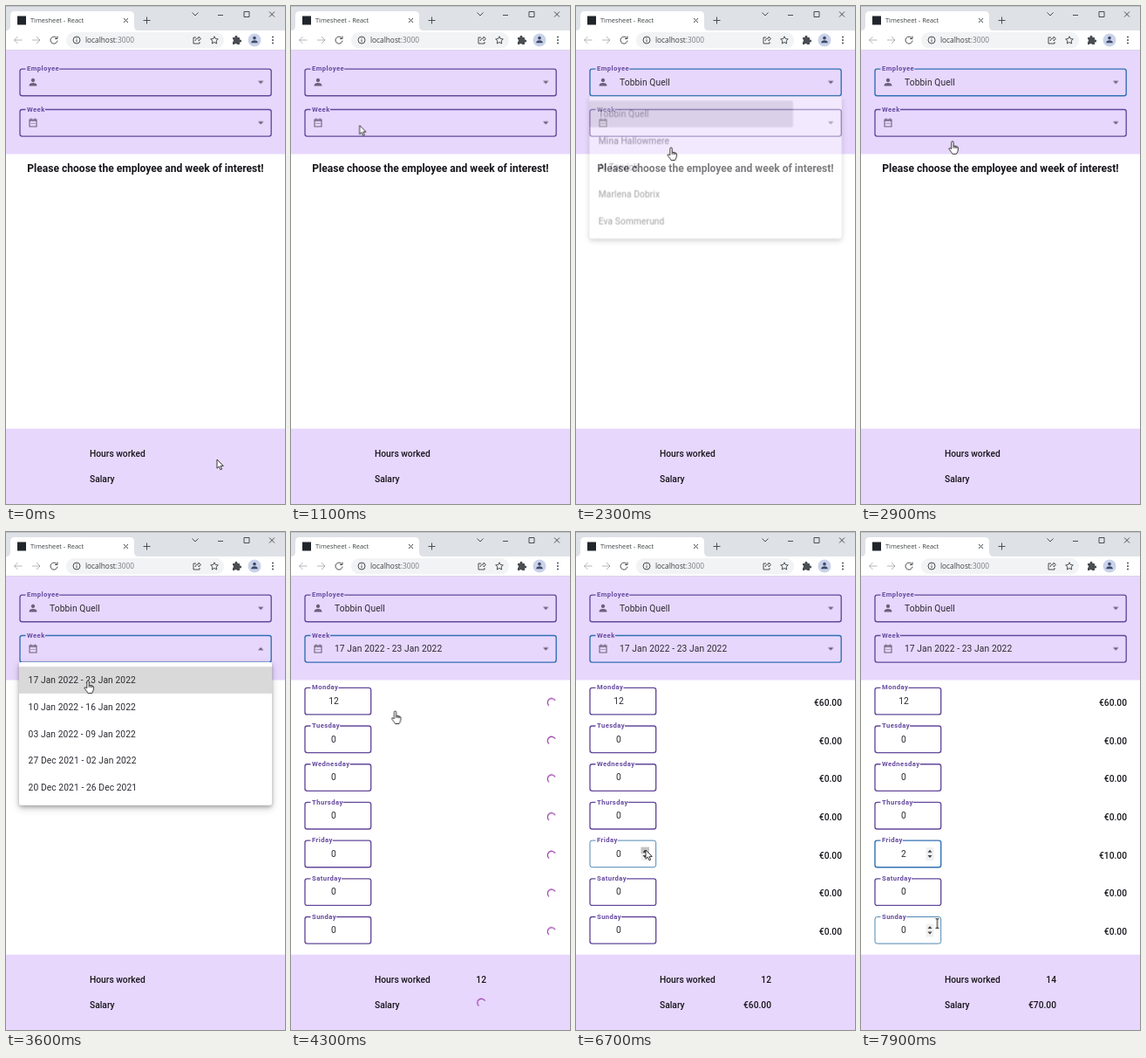
An HTML page for the animation above (8 s loop, 320 px wide and 570 px high).

```html
<!DOCTYPE html>
<html lang="en">
<head>
<meta charset="utf-8">
<title>Timesheet</title>
<style>
html, body { margin: 0; width: 100%; height: 100%; overflow: hidden; background: #fff; }
svg { display: block; width: 320px; height: 570px; }
text { font: 10.24px Roboto, sans-serif; fill: #2b2830; }
.value { letter-spacing: .1px; }
.label { font-size: 7.7px; font-weight: 700; letter-spacing: .42px; fill: #664a9f; }
.strong { font-weight: 500; fill: #17151b; }
.prompt { font-size: 12.05px; font-weight: 700; fill: #17151b; }
.title, .url { font-family: "Open Sans", sans-serif; fill: #3c4043; }
.title { font-size: 7.4px; }
.url { font-size: 8.3px; }
.mid { text-anchor: middle; }
.end { text-anchor: end; }
.border { fill: none; }
.line { fill: none; stroke: #4a4d51; stroke-width: 1; }
.spin { fill: none; stroke: #a04bae; stroke-width: 1.3; animation: spin 1.6s -.5s linear infinite; }
.paper { fill: #fff; filter: drop-shadow(0 2px 2px rgba(0,0,0,.24)) drop-shadow(0 3px 4px rgba(0,0,0,.2)); }
.cursor { fill: #fff; stroke: #222; stroke-width: .9; stroke-linejoin: round; }
@keyframes spin { to { transform: rotate(360deg); } }
</style>
</head>
<body>
<svg id="stage" viewBox="0 0 320 570" xmlns="http://www.w3.org/2000/svg"></svg>
<script>
const LOOP = 8000;
const rules = [];

// Registers keyframes [ms, css] and returns the animation declaration.
function anim(frames, timing = 'step-end') {
  const name = 'k' + rules.length;
  const body = frames.map(([ms, css]) => `${ms / LOOP * 100}%{${css}}`).join('');
  rules.push(`@keyframes ${name}{${body}}`);
  return `animation:${name} ${LOOP}ms ${timing} infinite`;
}

// Content visible only inside the given [from, to] ranges.
function during(content, ...ranges) {
  const frames = ranges[0][0] ? [[0, 'opacity:0']] : [];
  for (const [from, to] of ranges) {
    frames.push([from, 'opacity:1']);
    if (to < LOOP) frames.push([to, 'opacity:0']);
  }
  return `<g style="${anim(frames)}">${content}</g>`;
}

const text = (x, y, cls, str) => `<text x="${x}" y="${y}" class="${cls}">${str}</text>`;
const rect = (x, y, w, h, fill, r = 0) =>
  `<rect x="${x}" y="${y}" width="${w}" height="${h}" rx="${r}" fill="${fill}"/>`;
const path = (d, attrs = 'class="line"') => `<path d="${d}" ${attrs}/>`;
const at = (x, y, content) => `<g transform="translate(${x} ${y})">${content}</g>`;

const BORDER = {
  idle: 'stroke:#63489a;stroke-width:1.35',
  hover: 'stroke:#4f88b3;stroke-width:1',
  focus: 'stroke:#3270b3;stroke-width:1.4'
};

const ruler = document.createElement('canvas').getContext('2d');
ruler.font = '7.7px Roboto, sans-serif';

// Outlined field with a gap in the top edge, as wide as its label in regular weight.
function field(x, y, w, label, states = []) {
  const h = 30.6, r = x + w, b = y + h;
  const gap = x + 8.5 + ruler.measureText(label).width + label.length * .42;
  const d = `M${gap} ${y}H${r - 2.5}a2.5 2.5 0 0 1 2.5 2.5V${b - 2.5}a2.5 2.5 0 0 1 -2.5 2.5` +
    `H${x + 2.5}a2.5 2.5 0 0 1 -2.5 -2.5V${y + 2.5}a2.5 2.5 0 0 1 2.5 -2.5H${x + 6.5}`;
  const style = anim([[0, BORDER.idle], ...states.map(([ms, s]) => [ms, BORDER[s]])]);
  return path(d, `class="border" style="${style}"`) + text(x + 8, y + 2.1, 'label', label);
}

const spinner = (x, y) => at(x, y, path('M-3 3.6A4.7 4.7 0 1 1 4.07 -2.35', 'class="spin"'));

const person = (fill, scale) =>
  path('M0 0a2.5 2.5 0 1 0-.01 0zM-5 5V3.7Q-4 1 0 1T5 3.7V5z', `fill="${fill}" transform="scale(${scale})"`);

function browser() {
  const controls = path('M213.5 7.5l3.5 3.5 3.5-3.5M243 10.5h6M273 6.5h6v6h-6zM302 6.5l6 6m0-6l-6 6');
  const tab = path('M0 28q5 0 5-5V11q0-5 5-5H142q5 0 5 5v12q0 5 5 5z', 'fill="#fff"');
  const nav = path('M18.5 39h-9m4-4l-4 4 4 4M30 39h9m-4-4l4 4-4 4', 'class="line" stroke-opacity=".4"') +
    path('M58.3 36.8a4 4 0 1 0 .7 2.8M59 34.5v3h-3');
  const info = '<circle cx="81" cy="39" r="4" class="line"/>' + path('M81 38.5v2.7M81 36.5v1');
  const share = path('M218 36h-3v7h7v-2M217 40q.5-3.3 4-3.3v-1.7l2.5 2.5-2.5 2.5v-1.6');
  const star = path('M239 34.8l1.3 2.7 3 .4-2.2 2.1.6 3-2.7-1.5-2.7 1.5.6-3-2.2-2.1 3-.4z');
  const puzzle = path('M260 36h2.5a1.6 1.6 0 1 1 3 0h2.5v2.5a1.6 1.6 0 1 1 0 3v2.5h-3a1.6 1.6 0 0 0-3 0h-2v-3a1.6 1.6 0 0 0 0-3z', 'fill="#4a4d51"');
  const dots = [35.5, 39, 42.5].map(y => `<circle cx="306" cy="${y}" r="1" fill="#4a4d51"/>`).join('');
  return rect(0, 0, 320, 28, '#dee1e6') + rect(0, 0, 320, .7, '#b4b7bd') + tab + rect(0, 28, 320, 23, '#fff') +
    rect(13, 11.5, 10, 10, '#20252b') + text(28, 19.3, 'title', 'Timesheet - React') +
    path('M135 14l5 5m0-5l-5 5M161.5 12.5v8m-4-4h8') + controls + nav +
    rect(69, 30, 181, 18.5, '#f1f3f4', 9.2) + info +
    text(91, 42, 'url', 'localhost<tspan fill="#777b80">:3000</tspan>') +
    share + star + puzzle + '<circle cx="285" cy="39" r="7.5" fill="#c9d2ea"/>' +
    at(285, 38.5, person('#3f4a66', .75)) + dots + rect(0, 50, 320, 1, '#dcd5e6');
}

function select(y, label, icon, value, pickedAt, opened, closed, states) {
  const tri = d => path(d, 'fill="#665a70"');
  return field(16, y, 288.2, label, states) + at(31, y + 15.1, icon) +
    during(text(50, y + 18.8, 'value', value), [pickedAt, LOOP]) +
    at(292.2, y + 15.2, during(tri('M-3.2-1.5h6.4L0 1.7z'), [0, opened], [closed, LOOP]) +
      during(tri('M-3.2 1.5h6.4L0-1.7z'), [opened, closed]));
}

// Dropdown that grows in around `open` and fades out after `close`.
function menu(y, items, open, close) {
  const step = 30.7, h = step * 5 + 10.2;
  const small = 'opacity:0;transform:scale(.75,.56)', full = 'opacity:1;transform:none';
  const style = anim([
    [0, small], [open, small],
    [open + 200, 'opacity:.8;transform:scale(.992,.99)'], [open + 280, full],
    [close, full], [close + 150, 'opacity:.45;transform:none'],
    [close + 300, small], [LOOP, small]
  ], 'linear');
  const rows = items.map((s, i) => text(25.6, y + 24.1 + i * step, 'value', s)).join('');
  return `<g style="transform-origin:160px ${y}px;${style}">` +
    `<rect x="15" y="${y}" width="290" height="${h}" rx="2.5" class="paper"/>` +
    during(rect(15, y + 5.1, 290, step, '#d9d9d9'), [open, close + 50]) +
    during(rect(15, y + 5.1, 234, step, '#c9c7cc', 2), [close + 50, close + 300]) +
    rows + '</g>';
}

const arrows = y => rect(74.5, y + 8, 9, 15, '#f0f0f0') +
  path(`M76.5 ${y + 13.6}l2.5-3 2.5 3zM76.5 ${y + 17}l2.5 3 2.5-3z`, 'fill="#444"');

const DAYS = ['Monday', 'Tuesday', 'Wednesday', 'Thursday', 'Friday', 'Saturday', 'Sunday'];
const HOVER = {
  Friday: [[5250, 'hover'], [5480, 'idle'], [6150, 'hover'], [6750, 'focus']],
  Saturday: [[5550, 'hover'], [6050, 'idle'], [7550, 'hover'], [7750, 'idle']],
  Sunday: [[7780, 'hover']]
};
const ARROWS = {
  Friday: [[5250, 5480], [6150, LOOP]],
  Saturday: [[5550, 6050], [7550, 7750]],
  Sunday: [[7780, LOOP]]
};
const PAID = 4450;

function row(day, i) {
  const y = 178.3 + i * 43.7, friday = day === 'Friday';
  const hours = s => text(49, y + 18.5, 'value mid', s);
  const pay = s => text(305, y + 20.5, 'strong end', s);
  const wait = spinner(299, y + 17);
  let out = field(16, y, 75.7, day, HOVER[day]);
  if (friday) {
    out += during(hours(0), [0, 6800]) + during(hours(1), [6800, 7100]) + during(hours(2), [7100, LOOP]) +
      during(wait, [0, PAID], [6800, 7600]) +
      during(pay('€0.00'), [PAID, 6800]) + during(pay('€10.00'), [7600, LOOP]);
  } else {
    out += hours(i ? 0 : 12) + during(wait, [0, PAID]) +
      during(pay(i ? '€0.00' : '€60.00'), [PAID, LOOP]);
  }
  if (ARROWS[day]) out += during(arrows(y), ...ARROWS[day]);
  if (friday) out += during(rect(74.5, y + 7.5, 9.5, 7.5, '#c4c4c4') +
    path(`M76.5 ${y + 13.6}l2.5-3 2.5 3z`, 'fill="#333"'), [6450, 7350]);
  return out;
}

function footer() {
  const hours = s => text(224, 516.2, 'strong end', s);
  const salary = s => text(224, 544.6, 'strong end', s);
  return rect(0, 483.7, 320, 87, '#e7d7fd') +
    text(96, 516.2, 'strong', 'Hours worked') + text(96, 544.6, 'strong', 'Salary') +
    during(hours(12), [4000, 6800]) + during(hours(13), [6800, 7100]) + during(hours(14), [7100, LOOP]) +
    during(spinner(218.5, 539), [4000, PAID], [6900, 7800]) +
    during(salary('€60.00'), [PAID, 6900]) + during(salary('€70.00'), [7800, LOOP]);
}

function cursor() {
  const moves = [
    [0, 242, 519], [200, 242, 519], [300, 241, 517], [400, 241, 517], [700, 84, 215], [900, 84, 215],
    [1200, 76, 98], [1400, 74, 92], [1600, 78, 109], [1800, 82, 124], [2100, 84, 124], [2300, 109, 162],
    [2500, 112, 170], [2800, 112, 170], [3000, 98, 140], [3250, 93, 136], [3500, 93, 166],
    [3600, 94, 170], [3950, 97, 172], [4300, 119.5, 205], [4550, 119.5, 205], [4800, 112, 240],
    [5400, 82, 366], [5600, 80, 402], [5900, 80, 402], [6100, 82, 385], [6500, 80, 365],
    [6700, 80, 364], [7300, 80, 364], [7700, 87, 425], [7900, 87.5, 448], [LOOP, 87.5, 448]
  ].map(([ms, x, y]) => [ms, `transform:translate(${x}px,${y}px)`]);
  const arrow = path('M0 0V10.2L2.4 8 4 11.8 5.7 11 4.1 7.4H7.3Z', 'class="cursor"');
  const hand = path('M-1.2 8V1.2a1.2 1.2 0 0 1 2.4 0V5.2l3.6.7q1.8.5 1.8 2.3l-.6 3.3-1.5 3H0q-1-1.8-2.3-3.4-1.7-2-1.9-2.8.8-1.3 3 .4zM1.2 5.2v2.6M3.1 5.6v2.4M4.9 6v2.2', 'class="cursor"');
  const beam = path('M-2-5.5q2 0 2 1 0-1 2-1M0-4.5v9M-2 5.5q2 0 2-1 0 1 2 1', 'fill="none" stroke="#222" stroke-width="1.1"');
  return `<g style="${anim(moves, 'linear')}">` +
    during(arrow, [0, 1150], [1450, 1700], [4500, 7500]) +
    during(hand, [1150, 1450], [1700, 4500]) +
    during(beam, [7500, LOOP]) + '</g>';
}

const PEOPLE = ['Tobbin Quell', 'Mina Hallowmere', 'Al Torvick', 'Marlena Dobrix', 'Eva Sommerund'];
const WEEKS = ['17 Jan 2022 - 23 Jan 2022', '10 Jan 2022 - 16 Jan 2022', '03 Jan 2022 - 09 Jan 2022',
  '27 Dec 2021 - 02 Jan 2022', '20 Dec 2021 - 26 Dec 2021'];
const ICON = '#6d6079';
const calendar = path('M-4-3.6h8v8h-8zM-4-2.4h8M-2.2-5v2M2.2-5v2', `fill="none" stroke="${ICON}" stroke-width="1.1"`) +
  [-2.4, -.5, 1.4].map(x => rect(x, .3, 1, 1, ICON)).join('');

const scene = rect(0, 0, 320, 570, '#fff') + browser() + rect(0, 51, 320, 118.5, '#e7d7fd') +
  select(72.1, 'Employee', person(ICON, .88), PEOPLE[0], 2200, 1400, 2150, [[1400, 'focus'], [3100, 'idle']]) +
  select(118.5, 'Week', calendar, WEEKS[0], 4000, 3250, 3950, [[3200, 'focus'], [6750, 'idle']]) +
  during(text(160, 190.2, 'prompt mid', 'Please choose the employee and week of interest!'), [0, 4000]) +
  during(DAYS.map(row).join(''), [4000, LOOP]) + footer() +
  menu(103.1, PEOPLE, 1400, 2150) + menu(149.1, WEEKS, 3250, 3950) + cursor();

const sheet = document.createElement('style');
sheet.textContent = rules.join('\n');
document.head.append(sheet);
document.getElementById('stage').innerHTML = scene;
</script>
</body>
</html>
```
